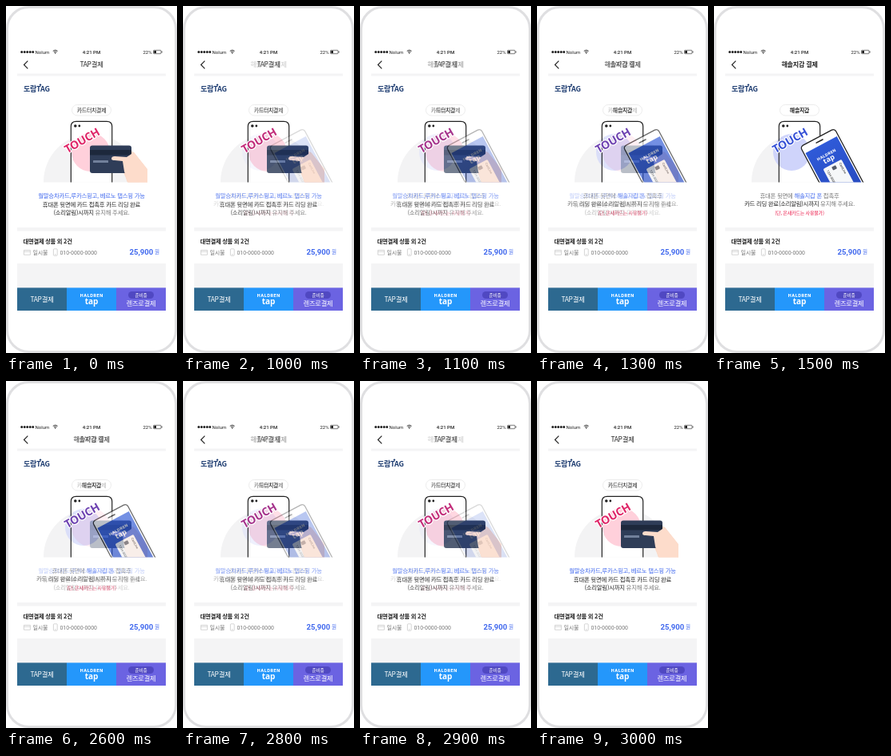
Recreate the animation shown at these times as an HTML page. Size 214 by 434 pixels, loop 3100 ms.

```html
<!DOCTYPE html>
<html lang="ko">
<head>
<meta charset="utf-8">
<title>Mobile checkout</title>
<style>
  html, body { margin: 0; width: 100%; height: 100%; overflow: hidden; background: #fff; }
  svg { display: block; width: 100%; height: 100%; }
  text {
    font: 7.4px "Noto Sans CJK KR", "Noto Sans CJK JP", "Noto Sans CJK", "Noto Sans", sans-serif;
    letter-spacing: -.25px;
    fill: #333;
  }
  .mid { text-anchor: middle; }
  .title { font-size: 8.4px; font-weight: 500; fill: #222; }
  .chip { font-size: 6.9px; font-weight: 500; fill: #222; }
  .status { font: 6px Roboto, sans-serif; letter-spacing: 0; fill: #222; }
  .strong { font-weight: 500; fill: #222; }
  .soft { font-weight: 400; fill: #777; }
  .blue { fill: #4169ee; }
  .note { font-size: 6.1px; fill: #ec2452; }
  .tab { font-size: 8.4px; fill: #fff; }
  .brand { font: 800 5.2px Inter, sans-serif; letter-spacing: .55px; fill: #fff; }
  .sub { font: 700 10px "Open Sans", sans-serif; letter-spacing: 0; fill: #fff; }
  .touch {
    font: 700 14px "Open Sans", sans-serif;
    letter-spacing: -.2px;
    text-anchor: middle;
    stroke: #fff; stroke-width: 2.4px; stroke-linejoin: round; paint-order: stroke;
  }
  .tiny { font-size: 3.8px; }
  /* Six hard steps of 100 ms in each direction */
  .wallet { opacity: 0; animation: blend 3100ms infinite; }
  @keyframes blend {
    0%, 28.97% { opacity: 0; animation-timing-function: steps(6, end); }
    48.32%, 77.35% { opacity: 1; animation-timing-function: steps(6, end); }
    96.71%, 100% { opacity: 0; }
  }
</style>
</head>
<body>
<svg viewBox="0 0 214 434">
  <defs>
    <clipPath id="stage"><rect x="37" y="112" width="155" height="108.5"/></clipPath>
    <linearGradient id="screen" x2="0" y2="1">
      <stop offset="0" stop-color="#2f5ad8"/>
      <stop offset="1" stop-color="#2546b8"/>
    </linearGradient>
    <g id="chip">
      <rect x="82.5" y="123.5" width="49" height="13.5" rx="6.75" fill="#fff" stroke="#e8e8e8" stroke-width=".8"/>
    </g>
    <g id="handset">
      <path d="M81.3 222V150.8Q81.3 144.3 87.8 144.3H126.2Q132.7 144.3 132.7 150.8V222" fill="none" stroke="#222" stroke-width="1.2"/>
      <circle cx="86.8" cy="150" r="1.8" fill="#222"/>
      <circle cx="91.8" cy="150" r="1.4" fill="#222"/>
    </g>
    <g id="backdrop">
      <circle cx="107" cy="220" r="60" fill="#f3f3f4"/>
      <rect x="81.3" y="144.3" width="51.4" height="90" rx="6.5" fill="#fff"/>
    </g>
  </defs>

  <rect width="214" height="434" fill="#fff"/>
  <rect x="1.5" y="1.5" width="211" height="431" rx="27" fill="#fff" stroke="#dfdfe1" stroke-width="3"/>

  <!-- Status bar -->
  <path d="M19.7 57.5h15" stroke="#222" stroke-width="3" stroke-linecap="round" stroke-dasharray="0 3.5"/>
  <text class="status" x="36.5" y="59.6">Nolum</text>
  <g fill="none" stroke="#222" stroke-width=".9">
    <path d="M58.8 56.3q2.9-2.4 5.8 0M59.9 57.7q1.8-1.5 3.6 0"/>
    <circle cx="61.7" cy="59" r=".4"/>
  </g>
  <text class="status mid" x="107" y="59.6" style="font-weight:500">4:21 PM</text>
  <text class="status" x="171.5" y="59.6">22%</text>
  <rect x="184.5" y="55.3" width="9.5" height="4.4" rx=".8" fill="none" stroke="#222" stroke-width=".6"/>
  <path d="M185.2 56h2.8v3h-2.8zM194.6 56.6h.8v1.8h-.8z" fill="#222"/>

  <!-- Header -->
  <path d="M27.3 68.7l-4.8 4.8 4.8 4.8" fill="none" stroke="#222" stroke-width="1.2"/>
  <rect x="14" y="84.5" width="186" height="3" fill="#f4f4f5"/>
  <text x="22" y="107" style="font-size:9px;font-weight:700;fill:#1c3b70">도람TAG</text>
  <circle cx="43" cy="98.6" r="1.2" fill="#1c3b70"/>

  <!-- Card scene -->
  <g>
    <text class="title mid" x="107" y="76.4">TAP결제</text>
    <use href="#chip"/>
    <text class="chip mid" x="107" y="132.7">카드터치결제</text>
    <g clip-path="url(#stage)">
      <use href="#backdrop"/>
      <circle cx="106" cy="183" r="24" fill="#ffd0db"/>
      <use href="#handset"/>
      <path d="M143 187C150 181 156 179 161 184L175 202Q177 205 177 221H152Q148 208 143 203Z" fill="#fbd9c6"/>
      <rect x="105" y="174.5" width="52" height="34.5" rx="3" fill="#2f3d58"/>
      <rect x="105" y="180" width="52" height="6.5" fill="#1d283c"/>
      <rect x="109" y="193" width="19" height="3" rx=".6" fill="#71809b"/>
      <path d="M132 191Q132 188 136 188L151 189 160 183 177 204V221H153L148 207 146 194 136 193Q132 193 132 191Z" fill="#fddccb"/>
      <text class="touch" transform="translate(97.5 172.5) rotate(-30)" style="fill:#df2467">TOUCH</text>
    </g>
    <text class="mid blue" x="107" y="239.8">월말승차카드,루카스윙고, 베르노 탭스윙 가능</text>
    <text class="mid strong" x="107" y="250.6">휴대폰 뒷면에 카드 접촉후 카드 리딩 완료</text>
    <text class="mid strong" x="107" y="261.2">(소리알림)시까지 <tspan class="soft">유지해 주세요.</tspan></text>
  </g>

  <!-- Wallet scene -->
  <g class="wallet">
    <path d="M60 65h94v18H60zM37 112h155v153H37z" fill="#fff"/>
    <text class="title mid" x="107" y="76.4" style="font-size:8.1px;font-weight:700">해솔지갑 결제</text>
    <use href="#chip"/>
    <text class="chip mid" x="107" y="132.7" style="font-weight:700">해솔지갑</text>
    <g clip-path="url(#stage)">
      <use href="#backdrop"/>
      <circle cx="97" cy="183" r="23" fill="#cfd4fb"/>
      <use href="#handset"/>
      <g transform="translate(108 176) rotate(-28)">
        <rect width="48.5" height="100" rx="4" fill="#fff" stroke="#222" stroke-width="1.3"/>
        <path d="M20 5.2h9" stroke="#222" stroke-width="1.5" stroke-linecap="round"/>
        <rect x="2" y="10" width="44.5" height="90" fill="url(#screen)"/>
        <text class="brand mid" x="24.3" y="26" style="font-size:4.9px;letter-spacing:.35px">HALDREN</text>
        <text class="sub mid" x="24.3" y="33.5" style="font-size:9px">tap</text>
        <rect x="12" y="38" width="26" height="50" rx="2" fill="#f6f7f9"/>
        <rect x="22.5" y="41" width="5.5" height="4.5" rx=".8" fill="#555b68"/>
        <g transform="rotate(90)">
          <text class="status tiny" x="41" y="-33" style="font-size:3.8px">CardLine</text>
          <text class="status tiny" x="42" y="-15" style="font-size:3.8px">1234 0000</text>
        </g>
      </g>
      <text class="touch" transform="translate(97.5 172.5) rotate(-30)" style="fill:#3550d6">TOUCH</text>
    </g>
    <text class="mid soft" x="107" y="239.8">휴대폰 뒷면에 <tspan class="blue" font-weight="500">해솔지갑 폰</tspan> 접촉후</text>
    <text class="mid strong" x="107" y="250.4">카드 리딩 완료(소리알림)시까지 <tspan class="soft">유지해 주세요.</tspan></text>
    <text class="mid note" x="107" y="261.2">(단, 온새카드는 사용불가)</text>
  </g>

  <!-- Order summary -->
  <rect x="14" y="277" width="186" height="4.5" fill="#f4f4f5"/>
  <text x="21.5" y="296.6" style="font-weight:700;font-size:7.3px;fill:#222">대면결제 상품 외 2건</text>
  <g fill="none" stroke="#c4c4c4" stroke-width=".7">
    <path d="M22.4 305.4h8v5.8h-8zM22.4 307.2h8"/>
    <rect x="59.4" y="303.8" width="4.8" height="8.4" rx=".8"/>
    <path d="M61 310.8h1.6"/>
  </g>
  <text class="soft" x="33.5" y="311" style="font-size:7px">일시불</text>
  <text class="soft" x="67.5" y="310.8" style="font:6.9px Roboto,sans-serif;letter-spacing:0">010-0000-0000</text>
  <text class="blue" x="154.5" y="310.8" style="font:700 9.6px Roboto,sans-serif;letter-spacing:0">25,900</text>
  <text class="blue" x="186" y="310.4" style="font-size:6.6px">원</text>
  <rect x="14" y="322" width="186" height="31" fill="#f4f4f5"/>

  <!-- Tabs -->
  <rect x="14" y="352.4" width="62" height="28.6" fill="#2d6990"/>
  <rect x="76" y="352.4" width="62" height="28.6" fill="#2497fb"/>
  <rect x="138" y="352.4" width="62" height="28.6" fill="#6b63e2"/>
  <text class="tab mid" x="45" y="370.3">TAP결제</text>
  <text class="brand mid" x="107.3" y="364.2">HALDREN</text>
  <text class="sub mid" x="107" y="373">tap</text>
  <rect x="153" y="357" width="32" height="9" rx="4.5" fill="#5048c2"/>
  <text class="mid" x="169" y="363.7" style="font-size:5.7px;fill:#fff">준비중</text>
  <text class="tab mid" x="169" y="375.2" style="font-size:8.2px">렌즈로결제</text>
</svg>
</body>
</html>
```
